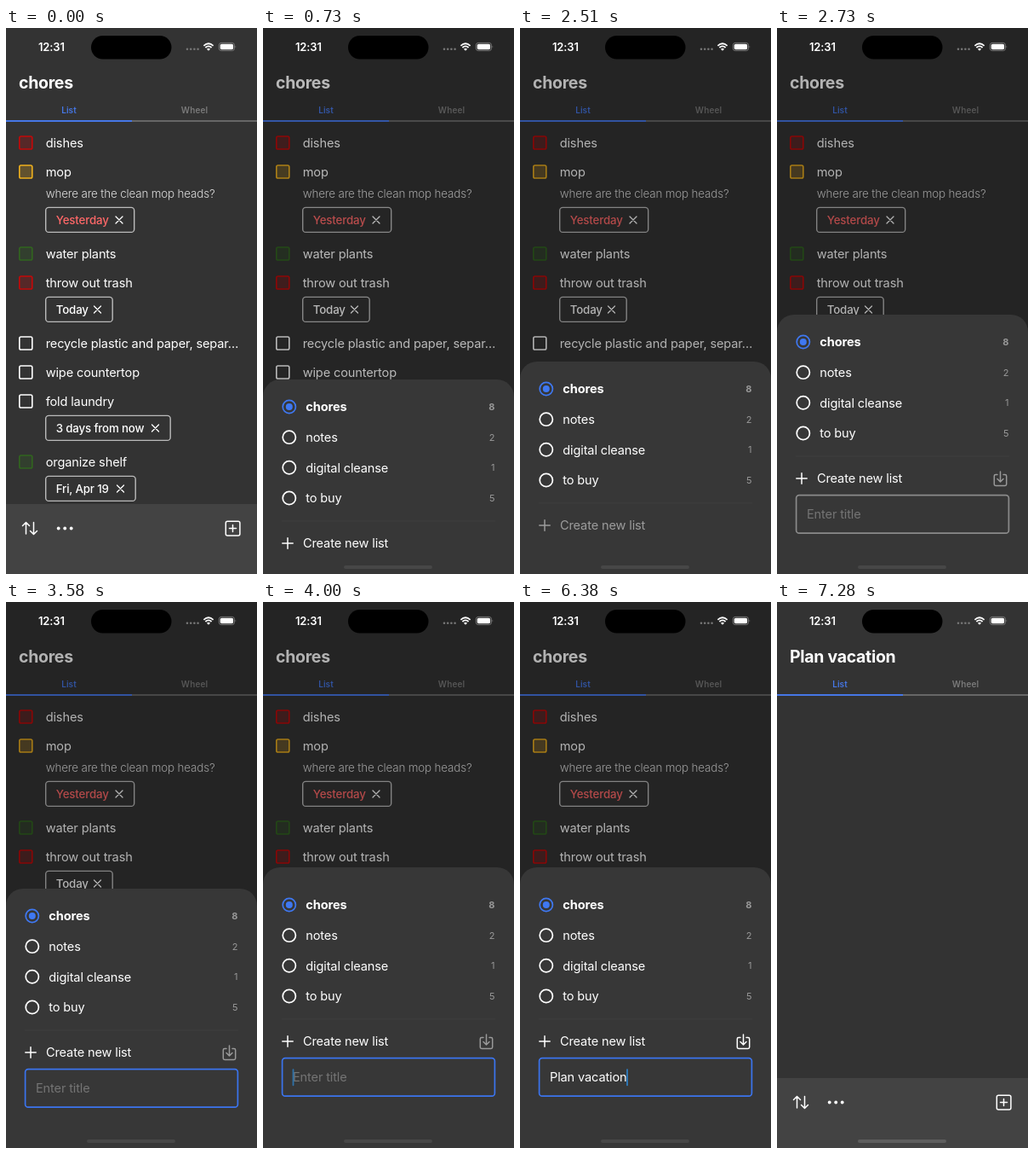
Recreate the animation shown at these times as an HTML page. Size 295 by 640 pixels, loop 8 s.

```html
<!DOCTYPE html>
<html lang="en">
<head>
<meta charset="utf-8">
<title>Chores list</title>
<style>
  html, body { margin: 0; width: 100%; height: 100%; overflow: hidden; background: #333; }
  svg { display: block; width: 100%; height: 100%; }
  text { font: 14.6px Inter, "Noto Sans", sans-serif; letter-spacing: -.15px; fill: #fff; white-space: pre; }
  .title { font-size: 19.5px; font-weight: 700; letter-spacing: -.3px; }
  .tab { font-size: 10px; font-weight: 600; letter-spacing: .1px; text-anchor: middle; }
  .hint { font-size: 13.4px; font-weight: 300; fill: #ddd; }
  .chip { font-size: 13.3px; font-weight: 500; }
  .clock { font-size: 13px; font-weight: 600; }
  .count { font-size: 11px; fill: #999; text-anchor: end; }
  .bold { font-weight: 700; }
  .line { fill: none; stroke: #fff; stroke-width: 1.5; stroke-linecap: round; stroke-linejoin: round; }
</style>
</head>
<body>
<svg viewBox="0 0 295 640">
  <rect width="295" height="640" fill="#333"/>
  <text id="title" class="title" x="15" y="71">chores</text>
  <text class="tab" x="74" y="100" style="fill:#4677e6">List</text>
  <text class="tab" x="221.5" y="100" style="fill:#7a7a7a">Wheel</text>
  <path d="M148 109H295" stroke="#777" stroke-width="1.3"/>
  <path d="M0 109H148" stroke="#4677e6" stroke-width="1.8"/>
  <g id="items"></g>

  <rect y="558" width="295" height="82" fill="#434343"/>
  <path class="line" d="M19.5 583.5L23.5 579.5L27.5 583.5M23.5 580V593M28.5 589.5L32.5 593.5L36.5 589.5M32.5 593V579.5"/>
  <g fill="#fff"><circle cx="61.7" cy="586.5" r="1.9"/><circle cx="69.2" cy="586.5" r="1.9"/><circle cx="76.7" cy="586.5" r="1.9"/></g>
  <path class="line" d="M266.5 582.5V590.5M262.5 586.5H270.5"/>
  <rect class="line" x="258.3" y="578.3" width="16.6" height="16.6" rx="2"/>

  <rect id="dim" width="295" height="640" opacity="0"/>

  <rect x="100" y="9" width="94.5" height="27.5" rx="13.7"/>
  <text class="clock" x="38" y="26.7">12:31</text>
  <g fill="#777"><circle cx="213" cy="24.8" r="1.3"/><circle cx="217.2" cy="24.8" r="1.3"/><circle cx="221.4" cy="24.8" r="1.3"/><circle cx="225.6" cy="24.8" r="1.3"/></g>
  <path class="line" style="stroke-width:1.8;stroke-linecap:butt" d="M232.4 20.8Q238 15.6 243.6 20.8M234.4 23Q238 19.8 241.6 23"/>
  <path d="M236 24.7Q238 23 240 24.7L238 26.8Z" fill="#fff"/>
  <rect x="250.3" y="17.4" width="18.2" height="9.2" rx="2.8" fill="none" stroke="#888" stroke-width=".8"/>
  <rect x="251.7" y="18.8" width="15.4" height="6.4" rx="1.7" fill="#fff"/>
  <path d="M269.6 20.5v3q1.4-1.5 0-3" fill="#888"/>

  <rect id="sheet" width="295" height="700" rx="20" fill="#373737"/>
  <g id="content">
    <g id="lists"></g>
    <path d="M22 134H273" stroke="#3f3f3f"/>
    <g id="create">
      <path class="line" d="M22.8 160H35.2M29 153.8V166.2"/>
      <text x="47" y="165.2">Create new list</text>
    </g>
    <g id="form">
      <path id="save" class="line" d="M259 155.5H257Q255.3 155.5 255.3 157.2V166.8Q255.3 168.5 257 168.5H268Q269.7 168.5 269.7 166.8V157.2Q269.7 155.5 268 155.5H266M262.5 152V163.5M259 160.5L262.5 164L266 160.5"/>
      <rect id="field" x="22.6" y="179.6" width="249.8" height="44.6" rx="3.5" fill="none" stroke-width="1.7"/>
      <text id="entry" x="35" y="207.2"></text>
      <rect id="caret" y="192.3" width="1.8" height="20" rx=".8" fill="#2b8ad8"/>
    </g>
  </g>
  <rect id="home" x="95" y="630" width="104" height="4" rx="2" fill="#fff"/>
</svg>
<script>
const $ = id => document.getElementById(id);
const set = (id, attrs) => { for (const k in attrs) $(id).setAttribute(k, attrs[k]); };

const RED = '#c40808', AMBER = '#eeb01e', GREEN = '#31651f', WHITE = '#fff';
const box = (y, color, label) =>
  `<rect x="15.8" y="${y - 7.5}" width="15" height="15" rx="1.8" stroke="${color}" stroke-width="1.6"
    fill="${color}" fill-opacity="${color === WHITE ? 0 : .25}"/><text x="46.7" y="${y + 5.3}">${label}</text>`;
const chip = (y, width, label, color = WHITE) => {
  const x = 47 + width - 18;
  return `<rect x="46.7" y="${y - 14.6}" width="${width}" height="29" rx="3.5" fill="none" stroke="#bbb" stroke-width="1.4"/>
    <text class="chip" x="58.7" y="${y + 4.8}" style="fill:${color}">${label}</text>
    <path class="line" style="stroke-width:1.3" d="M${x - 4} ${y - 4}l8 8m0-8l-8 8"/>`;
};
$('items').innerHTML =
  box(134.5, RED, 'dishes') +
  box(168.5, AMBER, 'mop') +
  '<text class="hint" x="46.7" y="199.3">where are the clean mop heads?</text>' +
  chip(225, 104, 'Yesterday', '#ff6868') +
  box(264.5, GREEN, 'water plants') +
  box(298.5, RED, 'throw out trash') +
  chip(330, 78.5, 'Today') +
  box(369.5, WHITE, 'recycle plastic and paper, separ…') +
  box(403.5, WHITE, 'wipe countertop') +
  box(437.5, WHITE, 'fold laundry') +
  chip(469, 146.5, '3 days from now') +
  box(508.5, GREEN, 'organize shelf') +
  chip(540, 105.5, 'Fri, Apr 19');

$('lists').innerHTML = [['chores', 8], ['notes', 2], ['digital cleanse', 1], ['to buy', 5]].map(([name, n], i) => {
  const y = i * 35.65, bold = i ? '' : 'bold', color = i ? WHITE : '#3f78f2';
  return `<circle cx="30.8" cy="${y}" r="7.6" fill="none" stroke="${color}" stroke-width="1.7"/>
    ${i ? '' : `<circle cx="30.8" cy="${y}" r="4" fill="${color}"/>`}
    <text class="${bold}" x="50.3" y="${y + 5.2}">${name}</text>
    <text class="count ${bold}" x="272.3" y="${y + 4}">${n}</text>`;
}).join('');

const LOOP = 8000, NAME = 'Plan vacation';
// The screen refreshes only at these moments.
const ticks = [0, 500, 610, 730, 830, 940, 2510, 2620, 2730, 3580, 3680, 3790, 3900, 4000, 4100, 4210, 4330, 6380, 6950, 7060, 7170, 7280];
const keys = [4330, 4470, 4590, 4740, 4920, 5100, 5210, 5310, 5420, 5570, 5570, 5760, 5880];

const ramp = (t, start, dur) => Math.min(1, Math.max(0, (t - start) / dur));
const easeOut = p => 1 - (1 - p) ** 3;
const easeInOut = p => p * p * (3 - 2 * p);

function draw(now) {
  const time = now % LOOP;
  const t = ticks.filter(x => x <= time).pop();
  const open = t < 500 ? 0 : easeOut(ramp(t, 460, 481));
  const grow = easeOut(ramp(t, 2560, 170));
  const lift = easeInOut(ramp(t, 3580, 420));
  const close = t < 6950 ? 0 : easeOut(ramp(t, 6920, 350));
  const created = t >= 6950;

  const rest = 640 - 249 * open - 55 * grow - 25 * lift;
  const top = rest + (640 - rest) * close;
  set('sheet', { y: top });
  set('content', { transform: `translate(0 ${top + 32 + 12 * lift})` });
  set('dim', { opacity: .3 * open * (1 - close) });
  set('create', { opacity: t >= 2510 && t < 2730 ? .5 + .5 * grow : 1 });
  set('home', { opacity: t < 500 ? 0 : close === 1 ? .14 : .08 });

  $('title').textContent = created ? NAME : 'chores';
  $('items').style.display = created ? 'none' : '';

  const typed = NAME.slice(0, keys.filter(k => k <= time).length);
  const entry = $('entry');
  entry.textContent = typed || 'Enter title';
  entry.style.fill = typed ? WHITE : '#747474';
  $('save').style.stroke = typed ? WHITE : '#999';
  set('form', { opacity: grow });
  set('field', { stroke: t >= 3580 ? '#3b74ee' : '#8a8a8a' });
  set('caret', {
    x: 34.6 + (typed ? entry.getComputedTextLength() : 0),
    opacity: t < 3900 ? 0 : t < 4100 ? .7 : t < 6380 ? 1 : .85
  });
}

let start;
function frame(now) {
  start ??= now;
  draw(now - start);
  requestAnimationFrame(frame);
}
draw(0);
requestAnimationFrame(frame);
</script>
</body>
</html>
```
